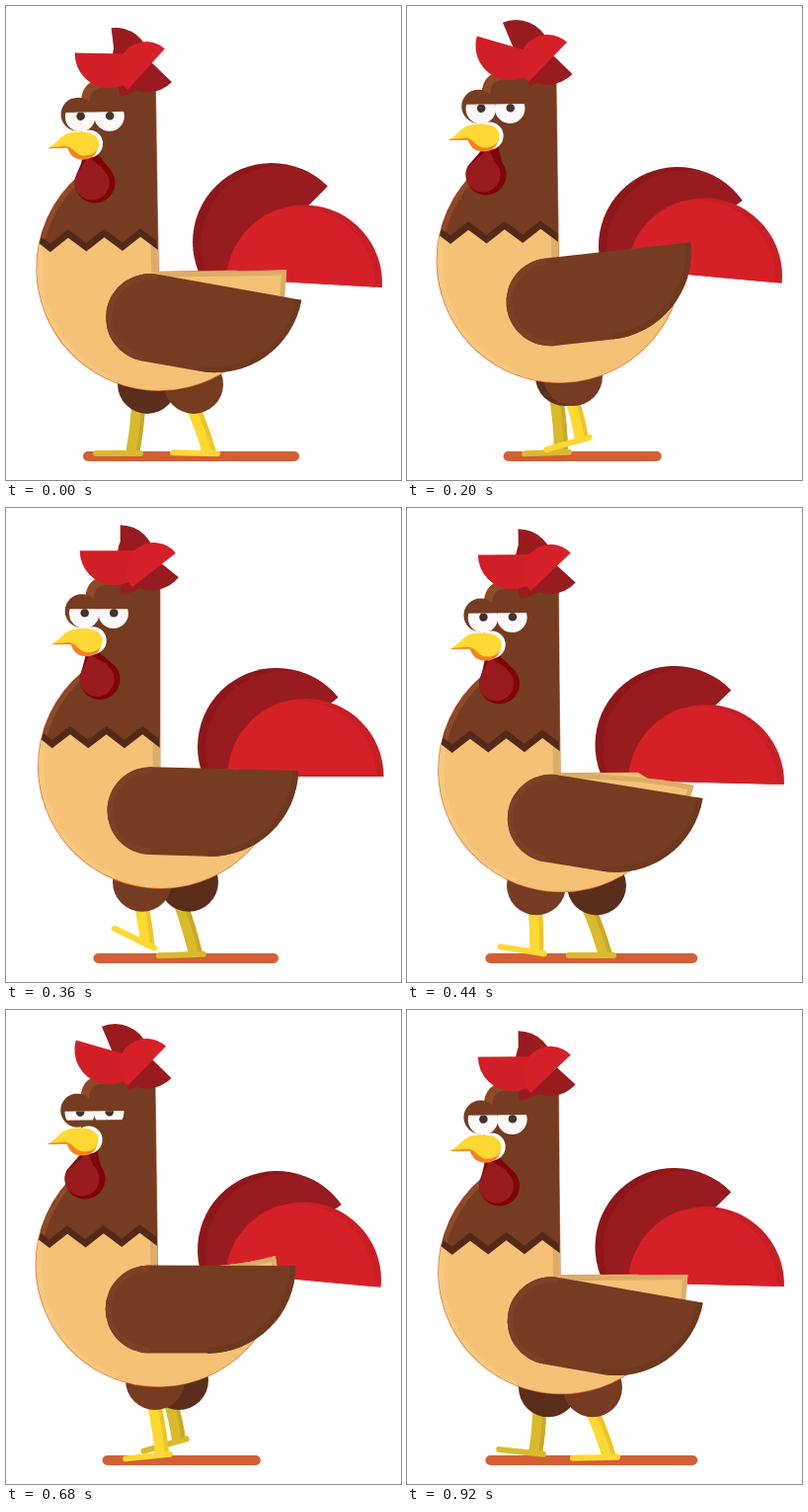
An HTML page with a canvas for the animation above (960 ms loop, 400 px wide and 480 px high).

```html
<!DOCTYPE html>
<html lang="en">
<head>
<meta charset="utf-8">
<title>Walking rooster</title>
<style>
html, body { margin: 0; width: 100%; height: 100%; overflow: hidden; background: #fff; }
canvas { display: block; width: 400px; height: 480px; }
</style>
</head>
<body>
<canvas id="stage" width="400" height="480"></canvas>
<script>
const g = document.getElementById('stage').getContext('2d');
const LOOP = 960, STEP = 40, HALF = LOOP / 2, RAD = Math.PI / 180;

const C = {
  brown: '#753c22', brownDark: '#5a2e1b', brownEdge: '#6e381f', brownLight: '#7b4126',
  collar: '#532a18', light: '#8d4a29', tan: '#f4c176', tanDark: '#dcad68',
  red: '#d62027', redSide: '#c71f26', crimson: '#981b1f', crimsonDark: '#8c181c',
  wattle: '#7f0408', yellow: '#fed833', yellowDark: '#ecc52c', dull: '#d9ba2d',
  dullDark: '#c9a92c', orange: '#f5821f', rim: '#dd6a35', floor: '#d35f37'
};

// Smooth periodic curve through keys (Hermite, finite-difference slopes).
function curve(times, values, period, t) {
  const n = times.length;
  const T = k => times[(k + n) % n] + period * Math.floor(k / n);
  const V = k => values[(k + n) % n];
  const slope = k => (V(k + 1) - V(k - 1)) / (T(k + 1) - T(k - 1));
  let i = n - 1;
  while (times[i] > t) i--;
  const h = T(i + 1) - T(i), u = (t - T(i)) / h, v = 1 - u;
  return V(i) * (1 + 2 * u) * v * v + slope(i) * h * u * v * v
       + V(i + 1) * u * u * (3 - 2 * u) - slope(i + 1) * h * u * u * v;
}

// Bobbing parts repeat with each footfall.
const BOB_T = [0, 200, 360, 440];
const BOB = {
  fanX: [302, 301, 303.5, 303], fanY: [280.5, 273.5, 272, 278], fanA: [3.3, 5.3, 0, 1.4],
  backX: [269, 274, 274, 270.5], backY: [239, 243, 242, 240], backA: [-45, -35, -39, -44],
  wattleX: [90, 80, 95, 93.5], wattleY: [179, 171, 173.5, 178],
  combL: [2, 17, 0, 0], combT: [-6, -22, 0, 0], combR: [-47, -45, -38, -43], combD: [6, 6, 0, 4]
};

// Legs and wings repeat once per full stride.
const STRIDE_T = [0, 200, 360, 440, 480, 680, 840, 920];
const NEAR = {
  hip: [190, 168, 138, 131, 131, 151, 181, 188],
  x: [206, 177, 143, 131, 128, 158, 194, 205],
  y: [453, 439, 442, 450, 453, 450.5, 451.5, 453],
  a: [1, -16, 26, 9, 0, -6, -6, -1]
};
const FAR = {
  hip: [143, 160, 185, 192, 192, 175, 150, 143],
  x: [128, 156, 192, 201, 202, 175, 141, 130],
  y: [453, 452, 452, 453, 453, 436.5, 440, 449],
  a: [0, -2, -2, 0, 0, -16, 25, 6]
};
const WING = {
  near: [11, -5.5, 1.5, 9.7, 11, 1, 5.7, 10.5],
  tipX: [286, 280, 284, 291.5, 292, 275.5, 280, 285.5],
  tipY: [265, 268, 272, 278.5, 278, 254, 258, 265.5]
};

function sample(set, times, period, t) {
  const out = {};
  for (const k in set) out[k] = curve(times, set[k], period, t);
  return out;
}

function fill(color, path) { g.fillStyle = color; path ? g.fill(path) : g.fill(); }

function disc(x, y, r, color) {
  g.beginPath();
  g.arc(x, y, r, 0, 2 * Math.PI);
  fill(color);
}

// Half disc whose round side faces (deg - 90).
function half(x, y, r, deg, color) {
  const p = new Path2D();
  p.arc(x, y, r, (deg + 180) * RAD, (deg + 360) * RAD);
  p.closePath();
  fill(color, p);
  return p;
}

function line(path, color, width, cap = 'butt') {
  g.strokeStyle = color;
  g.lineWidth = width;
  g.lineCap = cap;
  g.stroke(path);
}

function clipped(path, draw) {
  g.save();
  g.clip(path);
  draw();
  g.restore();
}

const box = (x, y, w, h) => { const p = new Path2D(); p.rect(x, y, w, h); return p; };

const body = new Path2D('M156 265V75Q156 69 150 69H104Q82 70 81 92V150L78 166' +
  'A124 124 0 0 0 33 262A124 124 0 0 0 277 292L235 265Z');
const crown = new Path2D('M104 69Q82 70 81 92');
const leftEdge = new Path2D('M78 166A124 124 0 0 0 33 262A124 124 0 0 0 110 377');
const wing = new Path2D('M28 -44.5H176A89 89 0 0 1 87 44.5H28A44.5 44.5 0 0 1 28 -44.5Z');
const wingFront = new Path2D('M28 44.5A44.5 44.5 0 0 1 28 -44.5');
const wingBack = new Path2D('M176 -44.5A89 89 0 0 1 87 44.5');
const beak = new Path2D('M47 137C57 133 59 122 75 122C90 121 98 126 98 134C98 142 91 146 84 146C73 146 73 136 63 136Z');
const underBeak = new Path2D('M46 138L62 131L97 138C95 147 88 150.5 81 150C71 149 69 145 66 138Z');

function drawTail(p) {
  const back = half(p.backX, p.backY, 80, p.backA, C.crimsonDark);
  clipped(back, () => disc(p.backX + 8, p.backY + 3, 80, C.crimson));
  const fan = half(p.fanX, p.fanY, 79, p.fanA, C.redSide);
  clipped(fan, () => disc(p.fanX - 8, p.fanY + 3, 80, C.red));
}

function drawLeg(leg, hipX, hipY, color, shade) {
  const midX = (hipX + leg.x) / 2 + 2, midY = (hipY + leg.y) / 2;
  const shin = dx => new Path2D(
    `M${hipX + dx} ${hipY}Q${midX + dx} ${midY} ${leg.x + dx} ${leg.y}`);
  line(shin(0), color, 14);
  line(shin(5), shade, 4);
  g.save();
  g.translate(leg.x, leg.y);
  g.rotate(leg.a * RAD);
  line(new Path2D('M-37 0H8'), color, 6, 'round');
  g.restore();
}

function drawFarWing(w) {
  const dx = w.tipX - 232, dy = w.tipY - 266, len = Math.hypot(dx, dy);
  const ex = w.tipX - dy / len * 28 - 3, ey = w.tipY + dx / len * 28;
  const edge = `M156 265Q232 266 ${w.tipX} ${w.tipY}L${ex} ${ey}`;
  const p = new Path2D(edge + 'L240 330H156Z');
  fill(C.tan, p);
  clipped(p, () => line(new Path2D(edge), C.tanDark, 10));
}

function zigzag(shift) {
  const p = new Path2D();
  p.moveTo(20, 0);
  p.lineTo(28, 228 + shift);
  for (let i = 0; i < 8; i++) p.lineTo(47 + i * 18.3, (i % 2 ? 229 : 243) + shift);
  p.lineTo(180, 0);
  return p;
}

function drawBody() {
  line(body, C.rim, 1.4);
  fill(C.tan, body);
  clipped(body, () => {
    g.fillStyle = C.tanDark;
    g.fillRect(149, 200, 7, 66);
    line(leftEdge, 'rgba(255,226,170,.16)', 12);
    fill(C.collar, zigzag(0));
    fill(C.brown, zigzag(-8.5));
    clipped(zigzag(-8.5), () => line(leftEdge, C.light, 10));
    line(crown, C.light, 16);
  });
}

function drawWattle(x, y, cx, cy) {
  const tip = [cx - 74, cy - 118];
  g.beginPath();
  g.moveTo(...tip);
  g.lineTo(tip[0] + 12, tip[1] + 2);
  g.lineTo(x + 16, y - 13);
  g.arc(x, y, 20.5, -40 * RAD, 205 * RAD);
  g.closePath();
  fill(C.wattle);
  g.beginPath();
  g.moveTo(tip[0] + 2, tip[1] + 4);
  g.lineTo(x + 8, y - 15);
  g.arc(x - 3, y, 17.5, -55 * RAD, 205 * RAD);
  g.closePath();
  fill(C.crimson);
}

function drawFace(blink) {
  disc(77, 104, 17, C.brown);
  const top = 102 + 3 * blink, bottom = 122 - 8 * blink;
  clipped(box(60, top, 70, bottom - top), () => {
    for (const x of [79.5, 109]) {
      disc(x, 106.5, 15.2, '#fcf9f8');
      disc(x + 0.5, 106, 4.3, '#45332b');
    }
  });
  disc(88, 134, 14, '#fff');
  fill(C.orange, underBeak);
  fill(C.yellow, beak);
}

function drawComb(p) {
  half(116, 52, 35, 90 + p.combT, C.crimson);
  half(148, 48, 35, 219 + p.combD, C.crimson);
  half(110, 43, 35, 180 + p.combL, '#d01f26');
  // This petal swings about its lower end.
  const a = p.combR * RAD;
  half(128 + 28 * Math.cos(a), 80 + 28 * Math.sin(a), 28, p.combR, C.red);
}

function drawWing(angle) {
  g.translate(119.3, 305.7);
  g.rotate(angle * RAD);
  fill(C.brown, wing);
  clipped(wing, () => {
    line(wingFront, C.brownLight, 12);
    line(wingBack, C.brownEdge, 12);
  });
}

function draw(t) {
  const ph = t / HALF * 2 * Math.PI, cos = Math.cos(ph), sin = Math.sin(ph);
  const cx = 155.1 - 1.6 * sin, cy = 262.2 + 4.2 * cos;
  const tilt = -0.65 - 0.65 * sin - 0.25 * cos;
  const bob = sample(BOB, BOB_T, HALF, t % HALF);
  const [near, far, wings] = [NEAR, FAR, WING].map(s => sample(s, STRIDE_T, LOOP, t));
  const inBody = f => {
    g.save();
    g.translate(cx, cy);
    g.rotate(tilt * RAD);
    g.translate(-157, -262);
    f();
    g.restore();
  };

  g.fillStyle = '#fff';
  g.fillRect(0, 0, 400, 480);

  const left = 88.5 - 10.5 * cos, right = 276 + 21 * cos;
  line(new Path2D(`M${left + 5} 456H${right - 5}`), C.floor, 10, 'round');

  drawTail(bob);

  const hipY = cy + 116.5;
  drawLeg(far, far.hip - 9, hipY + 20, C.dull, C.dullDark);
  drawLeg(near, near.hip - 2, hipY + 20, C.yellow, C.yellowDark);
  disc(far.hip, hipY, 30, C.brownDark);
  disc(near.hip, hipY, 30, C.brown);

  inBody(() => {
    drawBody();
    drawFarWing(wings);
  });
  drawWattle(bob.wattleX, bob.wattleY, cx, cy);
  inBody(() => {
    drawFace(Math.max(0, 1 - Math.abs(t - 680) / 100));
    drawComb(bob);
    drawWing(wings.near);
  });
}

function tick() {
  draw(Math.floor(performance.now() % LOOP / STEP) * STEP);
  requestAnimationFrame(tick);
}
tick();
</script>
</body>
</html>
```
